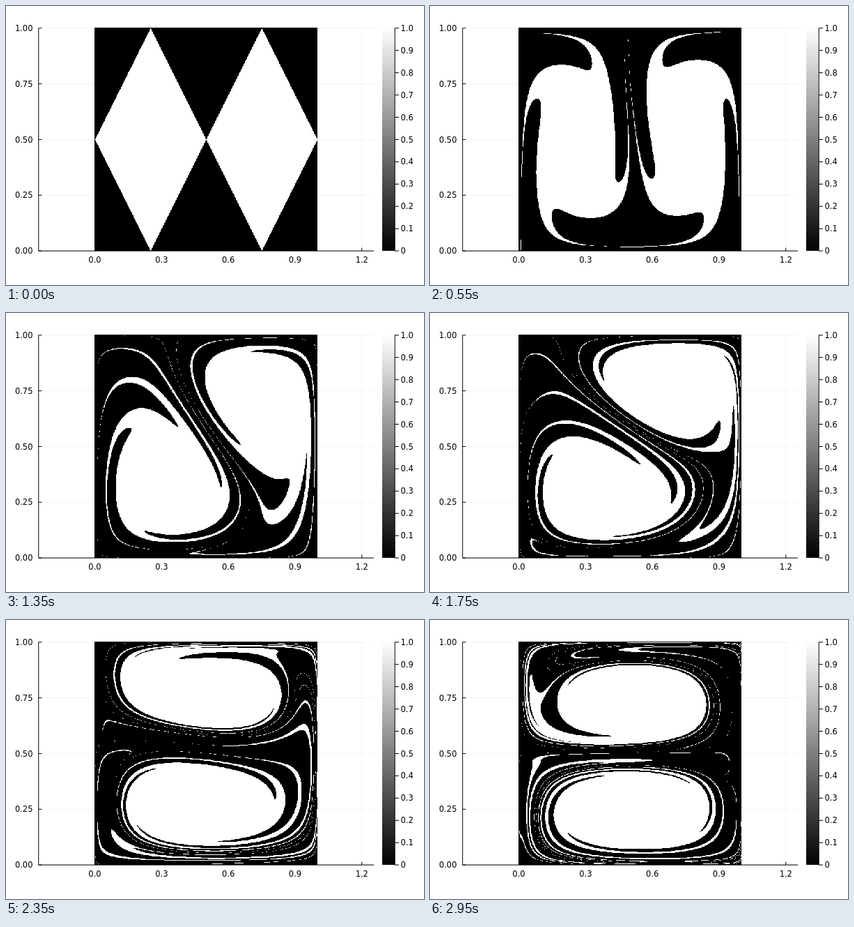
These frames come from a looping animation (600 by 400 pixels, 3000 ms). An HTML page with a canvas:

```html
<!DOCTYPE html>
<html lang="en">
<head>
<meta charset="utf-8">
<title>Rotating double gyre</title>
<style>
  html, body { margin: 0; width: 100%; height: 100%; overflow: hidden; background: #fff; }
  canvas { display: block; }
</style>
</head>
<body>
<canvas id="stage" width="600" height="400"></canvas>
<script>
const ctx = document.getElementById('stage').getContext('2d');
const FRAMES = 60, FRAME_MS = 50, SUBSTEPS = 2;
const GAP = 0.006;                       // longest contour segment
const NODES = 500;                       // sample grid across the unit square
const LEFT = 127, TOP = 31, SIZE = 320;  // pixels of the field
const X0 = 127.5, Y0 = 351.15, UNIT = 319.4;
const PI = Math.PI;

const px = x => X0 + UNIT * x;
const py = y => Y0 - UNIT * y;

// Stream function (1-s) sin(2 pi x) sin(pi y) + s sin(pi x) sin(2 pi y)
const blend = t => t * t * (3 - 2 * t);
let vx = 0, vy = 0;
function velocity(x, y, s) {
  const sx = Math.sin(PI * x), cx = Math.cos(PI * x);
  const sy = Math.sin(PI * y), cy = Math.cos(PI * y);
  vx = -2 * PI * sx * ((1 - s) * cx * cy + s * (1 - 2 * sy * sy));
  vy = 2 * PI * sy * ((1 - s) * (1 - 2 * sx * sx) + s * cx * cy);
}

// One Runge-Kutta step for every point of a curve
function advance(curve, t, h) {
  const { xs, ys } = curve;
  const s0 = blend(t), s1 = blend(t + h / 2), s2 = blend(t + h);
  for (let i = 0; i < xs.length; i++) {
    const x = xs[i], y = ys[i];
    velocity(x, y, s0);
    let dx = vx, dy = vy;
    velocity(x + vx * h / 2, y + vy * h / 2, s1);
    dx += 2 * vx; dy += 2 * vy;
    velocity(x + vx * h / 2, y + vy * h / 2, s1);
    dx += 2 * vx; dy += 2 * vy;
    velocity(x + vx * h, y + vy * h, s2);
    xs[i] = x + (dx + vx) * h / 6;
    ys[i] = y + (dy + vy) * h / 6;
  }
}

function middle(v, i) {
  const mid = (v[i] + v[i + 1]) / 2;
  if (i === 0 || i + 2 >= v.length) return mid;
  return (9 * 2 * mid - v[i - 1] - v[i + 2]) / 16;
}

// Splits segments that have been stretched too far
function refine({ xs, ys }) {
  const nx = [], ny = [], last = xs.length - 1;
  for (let i = 0; i < last; i++) {
    nx.push(xs[i]);
    ny.push(ys[i]);
    const dx = xs[i + 1] - xs[i], dy = ys[i + 1] - ys[i];
    if (dx * dx + dy * dy > GAP * GAP) {
      nx.push(middle(xs, i));
      ny.push(middle(ys, i));
    }
  }
  nx.push(xs[last]);
  ny.push(ys[last]);
  return { xs: nx, ys: ny };
}

function edge([ax, ay], [bx, by]) {
  const xs = [], ys = [], n = 160;
  for (let i = 0; i <= n; i++) {
    const u = i / n;
    xs.push(ax * (1 - u) + bx * u);
    ys.push(ay * (1 - u) + by * u);
  }
  return { xs, ys };
}

function diamond(cx) {
  const c = [[cx - 0.25, 0.5], [cx, 1], [cx + 0.25, 0.5], [cx, 0]];
  return c.map((p, i) => edge(p, c[(i + 1) % 4]));
}

// Even-odd fill, sampled at the grid nodes
function fill(curves) {
  const stride = NODES + 1, inside = new Uint8Array(stride * NODES);
  const col = x => x * (NODES - 1), row = y => (1 - y) * (NODES - 1);
  for (const { xs, ys } of curves) {
    for (let i = 1; i < xs.length; i++) {
      const r0 = row(ys[i - 1]), r1 = row(ys[i]);
      const from = Math.max(0, Math.ceil(Math.min(r0, r1)));
      const to = Math.min(NODES, Math.ceil(Math.max(r0, r1)));
      if (from >= to) continue;
      const c0 = col(xs[i - 1]), slope = (col(xs[i]) - c0) / (r1 - r0);
      for (let r = from; r < to; r++) {
        const c = Math.ceil(c0 + (r - r0) * slope);
        inside[r * stride + Math.min(NODES, Math.max(0, c))] ^= 1;
      }
    }
  }
  for (let r = 0; r < NODES; r++) {
    for (let c = 1; c < NODES; c++) inside[r * stride + c] ^= inside[r * stride + c - 1];
  }

  const img = new ImageData(SIZE, SIZE);
  const out = new Uint32Array(img.data.buffer);
  const node = p => Math.floor(p * NODES / SIZE);
  for (let r = 0; r < SIZE; r++) {
    for (let c = 0; c < SIZE; c++) {
      out[r * SIZE + c] = inside[node(r) * stride + node(c)] ? 0xffffffff : 0xff000000;
    }
  }
  return img;
}

function simulate() {
  let curves = [...diamond(0.25), ...diamond(0.75)];
  const frames = [fill(curves)];
  const step = 1 / (FRAMES - 1), h = step / SUBSTEPS;
  for (let k = 1; k < FRAMES; k++) {
    for (let j = 0; j < SUBSTEPS; j++) {
      for (const c of curves) advance(c, (k - 1) * step + j * h, h);
    }
    curves = curves.map(refine);
    frames.push(fill(curves));
  }
  return frames;
}

function line(x0, y0, x1, y1, color = '#000', width = 1) {
  ctx.strokeStyle = color;
  ctx.lineWidth = width;
  ctx.beginPath();
  ctx.moveTo(x0, y0);
  ctx.lineTo(x1, y1);
  ctx.stroke();
}

function label(text, x, y, align) {
  ctx.fillStyle = '#000';
  ctx.textAlign = align;
  ctx.fillText(text, x, y);
}

const X_TICKS = [0, 0.3, 0.6, 0.9, 1.2], Y_TICKS = [0, 0.25, 0.5, 0.75, 1];
const AXIS_X = 46.75, AXIS_END = 528, BAR_X = 540, BAR_END = 558;
const GRID = 'rgba(0, 0, 0, 0.1)';

function drawGrid() {
  for (const x of X_TICKS) line(px(x), py(1), px(x), Y0, GRID, 0.5);
  for (const y of Y_TICKS) line(AXIS_X, py(y), AXIS_END, py(y), GRID, 0.5);
}

function drawAxes() {
  line(AXIS_X, py(1), AXIS_X, Y0);
  line(AXIS_X, Y0, AXIS_END, Y0);
  for (const x of X_TICKS) {
    line(px(x), Y0, px(x), Y0 - 4.5);
    label(x.toFixed(1), px(x), 367.5, 'center');
  }
  for (const y of Y_TICKS) {
    line(AXIS_X, py(y), AXIS_X + 4.5, py(y));
    label(y.toFixed(2), 38.5, py(y) + 4.1, 'right');
  }
}

function drawBar() {
  const ramp = ctx.createLinearGradient(0, 351, 0, 31);
  ramp.addColorStop(0, '#000');
  ramp.addColorStop(1, '#fff');
  ctx.fillStyle = ramp;
  ctx.fillRect(BAR_X, TOP, BAR_END - BAR_X, SIZE);
  line(BAR_END + 0.2, py(1), BAR_END + 0.2, Y0);
  for (let i = 0; i <= 10; i++) {
    const y = py(i / 10);
    line(BAR_END, y, BAR_END + 6, y);
    label(i ? (i / 10).toFixed(1) : '0', 566.5, y + 4.1, 'left');
  }
}

function draw(field) {
  ctx.fillStyle = '#fff';
  ctx.fillRect(0, 0, 600, 400);
  ctx.font = '11.5px "DejaVu Sans", sans-serif';
  drawGrid();
  ctx.putImageData(field, LEFT, TOP);
  drawAxes();
  drawBar();
}

const frames = simulate();
const start = performance.now();
let shown = -1;

function tick() {
  const k = Math.floor((performance.now() - start) / FRAME_MS) % FRAMES;
  if (k !== shown) {
    draw(frames[k]);
    shown = k;
  }
  requestAnimationFrame(tick);
}
tick();
</script>
</body>
</html>
```
